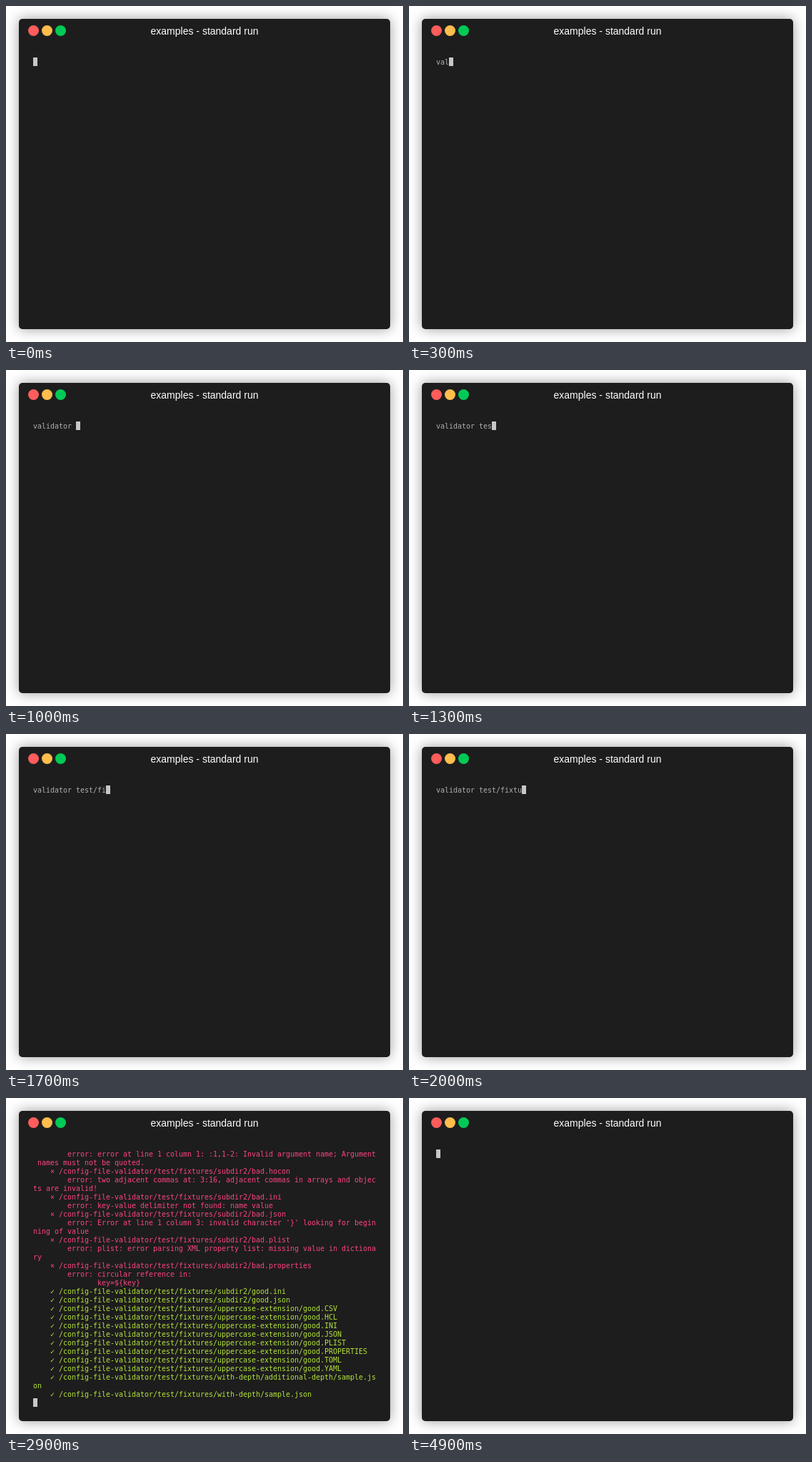
Recreate the animation shown at these times as an HTML page with a canvas. Size 556 by 470 pixels, loop 5000 ms.

```html
<!DOCTYPE html>
<html lang="en">
<head>
<meta charset="utf-8">
<title>Terminal</title>
<style>
  html, body { margin: 0; width: 100%; height: 100%; overflow: hidden; background: #fff; }
  canvas { display: block; }
</style>
</head>
<body>
<canvas id="stage" width="556" height="470"></canvas>
<script>
const ctx = document.getElementById('stage').getContext('2d');
const LOOP = 5000, KEY_MS = 100, OUTPUT_AT = 2900, CLEAR_AT = 4900;
const COLS = 80, CELL_W = 6, CELL_H = 12, LEFT = 38, TOP = 72;
const GREY = '#afafaf', RED = '#fc4384', GREEN = '#b3e33b', CURSOR = '#c7c7c7';
const COMMAND = 'validator test/fixtures';
const ROOT = '/config-file-validator/test/fixtures/';

const failures = [
  ['hocon', 'two adjacent commas at: 3:16, adjacent commas in arrays and objects are invalid!'],
  ['ini', 'key-value delimiter not found: name value'],
  ['json', "Error at line 1 column 3: invalid character '}' looking for beginning of value"],
  ['plist', 'plist: error parsing XML property list: missing value in dictionary'],
  ['properties', 'circular reference in:']
];
const passes = [
  'subdir2/good.ini', 'subdir2/good.json',
  ...['CSV', 'HCL', 'INI', 'JSON', 'PLIST', 'PROPERTIES', 'TOML', 'YAML']
    .map(ext => 'uppercase-extension/good.' + ext),
  'with-depth/additional-depth/sample.json', 'with-depth/sample.json'
];

const error = text => ' '.repeat(8) + 'error: ' + text;
const wrap = (line, color) => line.match(/.{1,80}/g).map(text => ({ text, color }));

const redLines = [
  error('error at line 1 column 1: :1,1-2: Invalid argument name; Argument names must not be quoted.'),
  ...failures.flatMap(([ext, text]) => [`    × ${ROOT}subdir2/bad.${ext}`, error(text)]),
  ' '.repeat(15) + 'key=${key}'
];
const output = [
  ...redLines.flatMap(line => wrap(line, RED)),
  ...passes.flatMap(path => wrap(`    ✓ ${ROOT}${path}`, GREEN))
];

function drawWindow() {
  ctx.fillStyle = '#fff';
  ctx.fillRect(0, 0, 556, 470);
  ctx.save();
  ctx.shadowColor = 'rgba(0, 0, 0, 0.4)';
  ctx.shadowBlur = 18;
  ctx.fillStyle = '#1d1d1d';
  ctx.beginPath();
  ctx.roundRect(18, 18, 520, 434, 5);
  ctx.fill();
  ctx.restore();

  ['#ff5c5c', '#ffbd4c', '#00ca56'].forEach((color, i) => {
    ctx.fillStyle = color;
    ctx.beginPath();
    ctx.arc(38.5 + i * 19, 34.5, 7.5, 0, Math.PI * 2);
    ctx.fill();
  });

  ctx.font = '14px "Liberation Sans", Arial, sans-serif';
  ctx.textAlign = 'center';
  ctx.fillStyle = '#fff';
  ctx.fillText('examples - standard run', 278, 40);
}

function drawLine(text, row, color) {
  ctx.font = '10px "DejaVu Sans Mono", monospace';
  ctx.textAlign = 'left';
  ctx.fillStyle = color;
  [...text].forEach((ch, col) => {
    if (ch !== ' ') ctx.fillText(ch, LEFT + col * CELL_W, TOP + row * CELL_H + 10);
  });
}

function drawCursor(col, row) {
  ctx.fillStyle = CURSOR;
  ctx.fillRect(LEFT + col * CELL_W, TOP + row * CELL_H, CELL_W, CELL_H);
}

function render(t) {
  drawWindow();
  if (t >= CLEAR_AT) {
    drawCursor(0, 0);
  } else if (t >= OUTPUT_AT) {
    output.forEach(({ text, color }, row) => drawLine(text, row, color));
    drawCursor(0, output.length);
  } else {
    const typed = Math.floor(t / KEY_MS);
    drawLine(COMMAND.slice(0, typed), 0, GREY);
    if (typed > COMMAND.length) drawCursor(0, 1);
    else drawCursor(typed, 0);
  }
}

const start = performance.now();
function tick() {
  render((performance.now() - start) % LOOP);
  requestAnimationFrame(tick);
}
tick();
</script>
</body>
</html>
```
